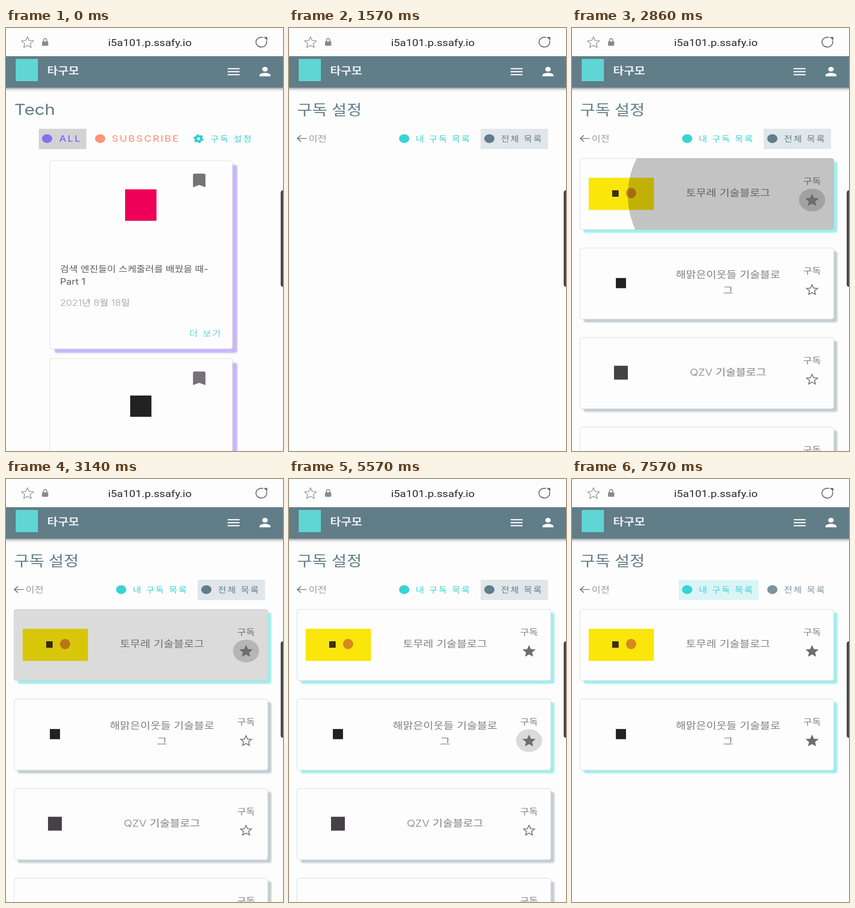
Recreate the animation shown at these times as an HTML page. Size 600x915 px, loop 8000 ms.

```html
<!DOCTYPE html>
<html lang="ko">
<head>
<meta charset="utf-8">
<title>구독 설정</title>
<style>
html, body { margin: 0; width: 100%; height: 100%; overflow: hidden; background: #fefdfe; }
svg { display: block; width: 100%; height: 100%; }
text { font-family: Inter, "Noto Sans CJK KR", "Noto Sans CJK", sans-serif; }
.url { font-family: Roboto, sans-serif; fill: #2b2b2b; }
.mid { text-anchor: middle; }
.thin { font-weight: 300; fill: #828182; }
.bold { font-weight: 700; }
.title { font-weight: 500; }
.button { font-weight: 500; letter-spacing: 2.3px; }
.link { font-weight: 300; letter-spacing: 2.3px; }
.header { fill: #617d88; filter: drop-shadow(0 2px 2px #0004) drop-shadow(0 3px 3px #0003); }
.soft { filter: blur(1.8px); }
.card { fill: #fefdfe; stroke: #dcdcde; stroke-width: 1.2; }

.hard { animation: 8s step-end infinite backwards; }
.tech { animation-name: tech; }
.settings { animation-name: settings; }
.list { animation-name: list; }
.unstarred { animation-name: unstarred; }
.allTab { animation-name: allTab; }
.myTab { animation-name: myTab; }
.dim { animation-name: dim; }
.starred { animation-name: starred; }
.shade { fill: #c3ced2; animation-name: shade; }
.tap { animation: tap 8s linear infinite; }
.ripple { animation: ripple 8s linear infinite backwards; }
.press0 { animation: press0 8s step-end infinite; }
.press1 { animation: press1 8s linear infinite; }
.second { animation-delay: .53s; }

@keyframes tech { 0% { opacity: 1 } 12.5%, 100% { opacity: 0 } }
@keyframes settings { 0% { opacity: 0 } 12.5%, 100% { opacity: 1 } }
@keyframes list { 0% { opacity: 0 } 23.2%, 100% { opacity: 1 } }
@keyframes unstarred { 0% { opacity: 1 } 78.5%, 100% { opacity: 0 } }
@keyframes allTab { 0% { opacity: 1 } 75%, 100% { opacity: 0 } }
@keyframes myTab { 0% { opacity: 0 } 75%, 100% { opacity: 1 } }
@keyframes dim { 0% { opacity: 1 } 75%, 100% { opacity: .82 } }
@keyframes starred { 0% { opacity: 0 } 34.7%, 100% { opacity: 1 } }
@keyframes shade { 0% { fill: #c3ced2 } 34.7%, 100% { fill: #9deeec } }
@keyframes tap { 0%, 1.6% { opacity: 0 } 4%, 5% { opacity: .13 } 7.1%, 100% { opacity: 0 } }
@keyframes ripple {
  0%, 34.6% { opacity: 0; transform: translate(520px, 90px) scale(.3); animation-timing-function: cubic-bezier(0, 0, .2, 1); }
  35%  { opacity: .23; transform: translate(438px, 85px) scale(.55); animation-timing-function: ease-out; }
  35.75% { opacity: .23; transform: translate(355px, 80px) scale(.806); animation-timing-function: ease-out; }
  37.75% { opacity: .23; transform: translate(292px, 77px) scale(1); }
  41.5%, 100% { opacity: 0; transform: translate(292px, 77px) scale(1); }
}
@keyframes press0 { 0% { opacity: 0 } 34.7% { opacity: .17 } 41.25%, 100% { opacity: 0 } }
@keyframes press1 {
  0%, 41.24% { opacity: 0 } 41.25% { opacity: .2 } 48.25% { opacity: .18 }
  56%, 74.99% { opacity: .14 } 75%, 100% { opacity: 0 }
}
</style>
</head>
<body>
<svg id="stage" viewBox="0 0 600 915" preserveAspectRatio="none"></svg>
<script>
const WIDE = 1.16; // the phone screen is shown a little widened
const STAR = 'M12 17.27L18.18 21L16.54 13.97L22 9.24L14.81 8.62L12 2L9.19 8.62L2 9.24L7.45 13.97L5.82 21Z';
const PERSON = 'M12 12a4 4 0 1 0 0-8a4 4 0 1 0 0 8zm0 2c-2.67 0-8 1.34-8 4v2h16v-2c0-2.66-5.33-4-8-4z';
const BOOKMARK = 'M17 3H7a2 2 0 0 0-2 2v16l7-3l7 3V5a2 2 0 0 0-2-2z';

const text = (x, y, size, string, cls = '', fill = '') =>
  `<text class="${cls}" transform="translate(${x} ${y}) scale(${WIDE} 1)" font-size="${size}" ${fill && `style="fill:${fill}"`}>${string}</text>`;
const rect = (x, y, w, h, attrs) => `<rect x="${x}" y="${y}" width="${w}" height="${h}" ${attrs}/>`;
const square = (cx, cy, size, fill) => rect(cx - size / 2, cy - size / 2, size, size, `fill="${fill}"`);
const dot = (x, fill) => `<ellipse cx="${x}" cy="239.3" rx="11" ry="9.6" fill="${fill}"/>`;
const icon = (path, x, y, sx, sy, attrs) => `<path d="${path}" transform="translate(${x} ${y}) scale(${sx} ${sy})" ${attrs}/>`;
const star = (cx, cy, size, attrs) =>
  icon(STAR, cx - 12 * size * 1.08, cy - 11.5 * size, size * 1.08, size, attrs);
const hard = (name, body) => `<g class="hard ${name}">${body}</g>`;

const browserBar = `
  ${star(46.5, 30.5, 1.22, 'fill="none" stroke="#999" stroke-width="1.3" stroke-linejoin="round"')}
  ${rect(78, 29, 13.5, 9.5, 'rx="1.5" fill="#8a8a8a"')}
  <path d="M81 29v-2.5a3.6 3.6 0 0 1 7.4 0V29" fill="none" stroke="#8a8a8a" stroke-width="2"/>
  ${text(221, 38.5, 20.7, 'i5a101.p.ssafy.io', 'url')}
  <path d="M557 20.6A11.6 10.6 0 1 0 564 27" fill="none" stroke="#666" stroke-width="1.9"/>
  <path d="M558 19.5h8v7.5z" fill="#666"/>`;

const header = `
  ${rect(-10, 61, 620, 68, 'class="header"')}
  ${square(45, 91, 48, '#5fd6d4')}
  ${text(89, 100, 21.7, '타구모', 'bold', '#e9eff1')}
  <path d="M480 88h26M480 94.5h26M480 101h26" stroke="#fff" stroke-width="2.3"/>
  ${icon(PERSON, 543, 79, 1.5, 1.28, 'fill="#fff"')}`;

const article = (y, height, logo) => `
  ${rect(105, y + 9, 396, height, 'rx="5" fill="#c5b8fb" class="soft"')}
  ${rect(94.5, y, 396, height, 'rx="5" class="card"')}
  ${icon(BOOKMARK, 395.4, y + 23, 1.93, 1.64, 'fill="#757375"')}
  ${logo}`;

const gear = `<g transform="translate(417 239.5) scale(${WIDE} 1)" fill="none" stroke="#2fcdd2">
  <circle r="5.2" stroke-width="4.6"/><circle r="8.3" stroke-width="2.6" stroke-dasharray="4.35"/></g>`;

const techPage = `
  ${text(18, 188, 33, 'Tech', '', '#617d86')}
  ${rect(71, 218, 103, 44, 'fill="#d4d3d4"')}
  ${dot(89, '#8b6df2')}${text(115, 245.5, 19, 'ALL', 'button', '#8467ee')}
  ${dot(204, '#f9967c')}${text(229, 245.5, 19, 'SUBSCRIBE', 'button', '#fa9b84')}
  ${rect(399, 218, 145, 44, 'fill="#2fcdd2" class="tap"')}
  ${gear}${text(442.5, 245.5, 17.2, '구독 설정', 'button', '#45d1d5')}
  ${article(287, 407, square(292, 383, 68, '#ee0058'))}
  ${text(117, 528, 18, '검색 엔진들이 스케줄러를 배웠을 때-', '', '#5c5c5c')}
  ${text(117, 555, 18.2, 'Part 1', '', '#5c5c5c')}
  ${text(117, 601, 18.2, '2021년 8월 18일', 'thin', '#a3a3a3')}
  ${text(397, 667, 17, '더 보기', 'link', '#5cd5d6')}
  ${article(715, 260, square(292, 818, 46, '#222'))}`;

const blogs = [
  { lines: ['토무레 기술블로그'],
    logo: rect(36, 42, 141.5, 69.5, 'fill="#fae60a"') + square(94, 76, 14, '#3b3012') +
          '<circle cx="128" cy="75" r="11" fill="#d8881c"/>' },
  { lines: ['해맑은이웃들 기술블로', '그'], logo: square(106, 76, 22, '#222') },
  { lines: ['QZV 기술블로그'], logo: square(106, 76, 30, '#444246') },
  { lines: [], logo: '' }
];

const blogCard = ({ lines, logo }, i) => {
  const active = i < 2;
  const delay = i === 1 ? 'second' : '';
  const firstLine = lines.length > 1 ? 65.5 : 82;
  const effects = active ? `
    <g clip-path="url(#cardClip)"><ellipse rx="289" ry="249" class="ripple ${delay}"/></g>
    <ellipse cx="520" cy="90" rx="28.3" ry="24.6" class="press${i}"/>
    ${star(520, 90, 1.22, `fill="#6f6d6f" class="hard starred ${delay}"`)}` : '';
  return `<g transform="translate(0 ${282 + 193.8 * i})">
    ${rect(25, 7, 550, 154, `rx="5" class="soft ${active ? `hard shade ${delay}` : ''}" fill="#c3ced2"`)}
    ${rect(17.5, 0, 549.5, 154, 'rx="5" class="card"')}
    ${logo}
    ${lines.map((line, n) => text(338, firstLine + 33.5 * n, 20.6, line, 'thin mid')).join('')}
    ${text(520, 56, 18, '구독', 'thin mid')}
    ${star(520, 90, 1.1, 'fill="#fefdfe" stroke="#757375" stroke-width="1.6"')}
    ${effects}</g>`;
};

const cards = blogs.map(blogCard);
const settingsPage = `
  ${text(17.5, 187.5, 30.6, '구독 설정', 'title', '#617d86')}
  <path d="M38 239H18M26 232l-8 7l8 7" fill="none" stroke="#68757b" stroke-width="1.7"/>
  ${text(42.5, 245.5, 18.2, '이전', 'thin', '#9c9c9c')}
  ${hard('myTab', rect(231, 218, 173, 44, 'fill="#d9f5f5"'))}
  ${hard('allTab', rect(415, 218, 146, 44, 'fill="#e0e6e9"'))}
  ${dot(249.5, '#38d4d5')}${text(274.5, 245.5, 17, '내 구독 목록', 'button', '#3ed2d4')}
  ${hard('dim', dot(434, '#607d8a') + text(459, 245.5, 17, '전체 목록', 'button', '#647f8a'))}
  ${hard('list', cards.slice(0, 2).join('') + hard('unstarred', cards.slice(2).join('')))}`;

document.getElementById('stage').innerHTML = `
  <clipPath id="cardClip">${rect(17.5, 0, 549.5, 154, 'rx="5"')}</clipPath>
  ${rect(0, 0, 600, 915, 'fill="#fefdfe"')}
  ${hard('tech', techPage)}
  ${hard('settings', settingsPage)}
  ${header}
  ${rect(0, 0, 600, 61, 'fill="#fefdfe"')}
  ${browserBar}
  ${rect(595, 351, 12, 209, 'rx="5" fill="#474747"')}`;
</script>
</body>
</html>
```
